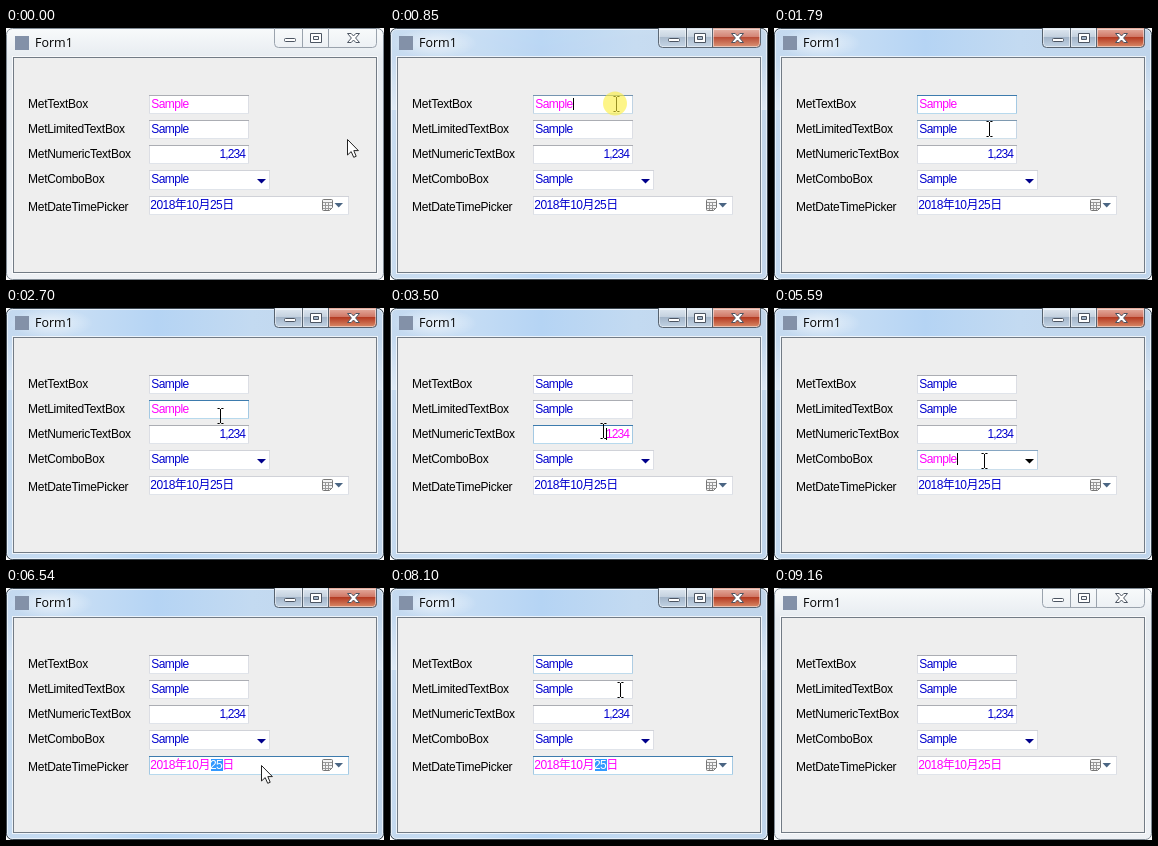
Animation, 378 px wide and 252 px high, one loop 9.24 s. Source, as an HTML page:

```html
<!DOCTYPE html>
<html lang="ja">
<head>
<meta charset="utf-8">
<title>Form1</title>
<style>
html, body { margin: 0; width: 378px; height: 252px; overflow: hidden; background: #fff; }
svg { display: block; }
text { font: 12px "Liberation Sans", "Noto Sans CJK JP", sans-serif; letter-spacing: -.27px; }
.value { letter-spacing: -.55px; fill: #0000cd; }
.number { letter-spacing: -.9px; }
.title { font: 12.5px "Open Sans", sans-serif; letter-spacing: 0; }
.line { fill: none; stroke-width: 1; }
.glyph { fill: #fff; stroke: #4c5562; stroke-width: 1; }
.caret, .pick { visibility: hidden; }
.pick { fill: #39f; }
</style>
</head>
<body>
<svg id="stage" width="378" height="252" viewBox="0 0 378 252">
  <defs>
    <linearGradient id="idle" x2="0" y2="1">
      <stop stop-color="#f8fafb"/><stop offset=".12" stop-color="#e6ebf0"/><stop offset="1" stop-color="#eef1f5"/>
    </linearGradient>
    <linearGradient id="live">
      <stop stop-color="#c4d9ef"/><stop offset=".2" stop-color="#c6ddf4"/><stop offset=".4" stop-color="#b5d4f4"/>
      <stop offset=".65" stop-color="#c3daf1"/><stop offset="1" stop-color="#c0d5eb"/>
    </linearGradient>
    <linearGradient id="shine" x2="0" y2="1">
      <stop stop-color="#fff" stop-opacity="0"/><stop offset="1" stop-color="#fff" stop-opacity=".45"/>
    </linearGradient>
    <radialGradient id="halo">
      <stop stop-color="#fff" stop-opacity=".65"/><stop offset="1" stop-color="#fff" stop-opacity="0"/>
    </radialGradient>
    <linearGradient id="steel" x2="0" y2="1">
      <stop stop-color="#e0e9f2"/><stop offset=".48" stop-color="#c3d0de"/>
      <stop offset=".5" stop-color="#a3b5c9"/><stop offset="1" stop-color="#c2d3e4"/>
    </linearGradient>
    <linearGradient id="red" x2="0" y2="1">
      <stop stop-color="#e6b0a2"/><stop offset=".48" stop-color="#cf7563"/>
      <stop offset=".5" stop-color="#b53b22"/><stop offset="1" stop-color="#d98a68"/>
    </linearGradient>
    <rect id="frame" x=".5" y=".5" width="377" height="251" rx="6"/>
    <path id="buttons" class="line" d="M268.5 0V15.5Q268.5 19.5 272.5 19.5H366.5Q370.5 19.5 370.5 15.5V0M296.5 0V19M322.5 0V19"/>
  </defs>

  <use href="#frame" fill="url(#idle)" stroke="#808a94"/>
  <use href="#buttons" stroke="#9aa3ad"/>
  <g id="active">
    <use href="#frame" fill="url(#live)" stroke="#3b4650"/>
    <ellipse cx="45" cy="15" rx="42" ry="15" fill="url(#halo)"/>
    <path d="M1 30H7V82H1ZM371 30H377V82H371Z" fill="url(#shine)"/>
    <rect x="1.5" y="1.5" width="375" height="249" rx="5" class="line" stroke="#fff" opacity=".6"/>
    <path d="M268 0H322V19H272Q268 19 268 15Z" fill="url(#steel)"/>
    <path d="M323 0H371V15Q371 19 367 19H323Z" fill="url(#red)"/>
    <path d="M269.5 1.5H295.5V18.5H272Q269.5 18.5 269.5 15ZM297.5 1.5H321.5V18.5H297.5ZM323.5 1.5H369.5V15Q369.5 18.5 367 18.5H323.5Z"
      class="line" stroke="#fff" opacity=".5"/>
    <use href="#buttons" stroke="#56626f"/>
  </g>
  <g class="glyph">
    <rect x="278.5" y="10.5" width="11" height="3" rx="1"/>
    <path fill-rule="evenodd" d="M304.5 5.5H315.5V14.5H304.5ZM307.5 8.5V11.5H312.5V8.5Z"/>
    <path d="M341.5 5.5H345.2L347.5 8 349.8 5.5H353.5L349.6 10 353.5 14.5H349.8L347.5 12 345.2 14.5H341.5L345.4 10Z"/>
  </g>
  <rect x="9" y="8" width="14" height="14" fill="#8391a8"/>
  <text class="title" x="29" y="19">Form1</text>

  <rect x="6.5" y="28.5" width="365" height="217" class="line" stroke="#fff" opacity=".7"/>
  <rect x="7.5" y="29.5" width="363" height="215" fill="#eee" stroke="#727b85"/>

  <g id="fields"></g>

  <rect class="pick" id="pickCombo" x="145" y="145" width="39" height="13"/>
  <rect class="pick" id="pickDay" x="205" y="171" width="12" height="12"/>
  <text class="value" id="v0" x="145.3" y="80">Sample</text>
  <text class="value" id="v1" x="145.3" y="105">Sample</text>
  <text class="value number" id="v2" x="239" y="130" text-anchor="end">1,234</text>
  <text class="value number" id="raw" x="239" y="130" text-anchor="end" style="fill:#f0f">1234</text>
  <text class="value" id="v3" x="145.3" y="155">Sample</text>
  <text class="value" id="v4" x="144.3" y="181">2018年10月<tspan id="day">25</tspan>日</text>

  <path id="drop" d="M251 151H260L255.5 155.5Z"/>
  <g id="calendar">
    <path d="M316.5 172.5Q316.5 171.5 317.5 171.5H325.5Q326.5 171.5 326.5 172.5V179.5L323.5 182.5H317.5Q316.5 182.5 316.5 181.5Z" fill="#f4f4f4" stroke="#777"/>
    <path d="M317 174.5H326M317 177.5H326M317 180.5H325M319.5 174V182M322.5 174V182" class="line" stroke="#999"/>
    <path d="M328.5 175H337L332.7 179.5Z" fill="#4a6583"/>
  </g>

  <g id="carets"></g>

  <g id="cursor">
    <path id="beam" class="line" stroke="#000" transform="translate(.5 0)"
      d="M-3-7.5H-1L0-6.5 1-7.5H3M0-7V7M-3 7.5H-1L0 6.5 1 7.5H3"/>
    <path id="arrow" fill="#fff" stroke="#222" stroke-width="1"
      d="M.5 .5V16L4.2 12.6 6.7 18.3 9.2 17.3 6.8 11.6H11.4Z"/>
    <circle id="click" cx="-1" cy="-.5" r="12" fill="#fbee38" opacity=".6"/>
  </g>
</svg>
<script>
const LOOP = 9240, BLUE = '#0000cd', PINK = '#f0f';
const $ = id => document.getElementById(id);
const sheet = document.head.appendChild(document.createElement('style'));

// Stepped keyframes from [ms, value] pairs
function track(id, prop, keys) {
  const rule = ([ms, v]) => `${(ms / LOOP * 100).toFixed(3)}%{${prop}:${v}}`;
  const end = [LOOP, keys[keys.length - 1][1]];
  sheet.textContent += `@keyframes ${id}-k{${[...keys, end].map(rule).join('')}}
#${id}{animation:${id}-k ${LOOP}ms step-end -20ms infinite}`;
}
// Visible only during the given [from, to] spans
function show(id, ...spans) {
  track(id, 'visibility', [[0, 'hidden'], ...spans.flatMap(([a, b]) => [[a, 'visible'], [b, 'hidden']])]);
}

const fields = [
  ['MetTextBox', 67, 100, 19, 80],
  ['MetLimitedTextBox', 92, 100, 19, 105],
  ['MetNumericTextBox', 117, 100, 19, 130],
  ['MetComboBox', 142, 121, 20, 155],
  ['MetDateTimePicker', 168, 200, 19, 183]
];
const edges = (y, w, h, top, side, base) =>
  `<path class="line" stroke="${side}" d="M143.5 ${y}v${h}M${142.5 + w} ${y}v${h}"/>
   <path class="line" stroke="${base}" d="M143 ${y + h - .5}h${w}"/>
   <path class="line" stroke="${top}" d="M143 ${y + .5}h${w}"/>`;
$('fields').innerHTML = fields.map(([name, y, w, h, base], i) =>
  `<text x="22" y="${base}">${name}</text>
   <rect x="143" y="${y}" width="${w}" height="${h}" fill="#fff"/>
   ${edges(y, w, h, i < 3 ? '#abadb3' : '#d0d2d8', '#dcdee4', '#e0e4ea')}
   <g id="glow${i}">${edges(y, w, h, '#3d7bad', '#a4c9e3', '#b7d9ed')}</g>`).join('');

// Highlighted borders
track('glow0', 'opacity', [[0, 0], [550, .3], [700, .5], [930, 1], [1870, .6], [1950, .2], [2030, 0],
  [7780, .4], [7860, .8], [8250, .6], [8560, .35], [8780, .15], [8880, 0]]);
track('glow1', 'opacity', [[0, 0], [1500, .4], [1870, .7], [1950, 1], [3260, .7], [3340, .3], [3420, 0]]);
track('glow2', 'opacity', [[0, 0], [2860, .5], [3260, .8], [3340, 1], [4610, .6], [4760, .2], [4910, 0]]);
track('glow3', 'opacity', [[0, 0], [4050, .5], [5900, .25], [6000, 0]]);
track('glow4', 'opacity', [[0, 0], [5970, .5], [6060, 1], [9160, 0]]);

// Focus
track('active', 'opacity', [[0, 0], [850, .9], [930, 1], [9160, 0]]);
track('v0', 'fill', [[0, PINK], [1870, BLUE]]);
track('v1', 'fill', [[0, BLUE], [1870, PINK], [3260, BLUE]]);
show('raw', [3260, 4530]);
track('v2', 'visibility', [[0, 'visible'], [3260, 'hidden'], [4530, 'visible']]);
track('v3', 'fill', [[0, BLUE], [4530, '#fff'], [4680, PINK], [6060, BLUE]]);
track('v4', 'fill', [[0, BLUE], [6060, PINK]]);
track('day', 'fill', [[0, BLUE], [6060, '#fff'], [9160, PINK]]);
show('pickCombo', [4530, 4680]);
show('pickDay', [6060, 9160]);
track('drop', 'fill', [[0, '#00008b'], [4050, '#000'], [5900, '#00008b'], [8320, '#000'], [8780, '#00008b']]);

// Carets blink every 530 ms from the moment of focus
[[183, 70, 850, 1870], [183, 95, 1870, 3260], [216, 120, 3260, 4530], [183, 145, 4530, 6060]]
  .forEach(([x, y, from, to], i) => {
    $('carets').innerHTML += `<rect class="caret" id="caret${i}" x="${x}" y="${y}" width="1" height="12"/>`;
    const spans = [];
    for (let t = from; t < to; t += 1060) spans.push([t, Math.min(t + 530, to)]);
    show('caret' + i, ...spans);
  });

// Pointer: n even steps between two times, each leg ending at [x, y]
let pos = [341, 111];
const path = [[0, pos]];
function go(from, to, n, x, y) {
  const [x0, y0] = pos;
  for (let i = 1; i <= n; i++) {
    const u = i / n, t = from + (to - from) * (i - 1) / (n - 1 || 1);
    path.push([t, pos = [Math.round(x0 + (x - x0) * u), Math.round(y0 + (y - y0) * u)]]);
  }
}
go(300, 700, 6, 226, 76);
go(1330, 1720, 5, 215, 101);
go(2700, 2700, 1, 214, 108);
go(2780, 3030, 4, 213, 123);
go(3800, 4210, 6, 210, 153);
go(5740, 6060, 5, 247, 174);
go(6140, 6290, 3, 251, 176);
go(6470, 6540, 2, 255, 177);
go(7310, 7470, 3, 273, 189);
go(7545, 7860, 5, 229, 77);
go(7940, 8095, 3, 230, 102);
go(8170, 8400, 4, 293, 282);

const editing = ([x, y]) => fields.slice(0, 4).some(([, top, w, h]) =>
  x >= 143 && x < 143 + Math.min(w, 106) && y >= top && y < top + h);
const when = test => path.map(([t, p]) => [t, test(p) ? 'visible' : 'hidden']);
track('cursor', 'transform', path.map(([t, [x, y]]) => [t, `translate(${x}px,${y}px)`]));
track('beam', 'visibility', when(editing));
track('arrow', 'visibility', when(p => !editing(p)));
show('click', [850, 930], [1870, 2100], [3260, 3500], [4530, 4680], [6060, 6210], [6990, 7160]);
</script>
</body>
</html>
```
